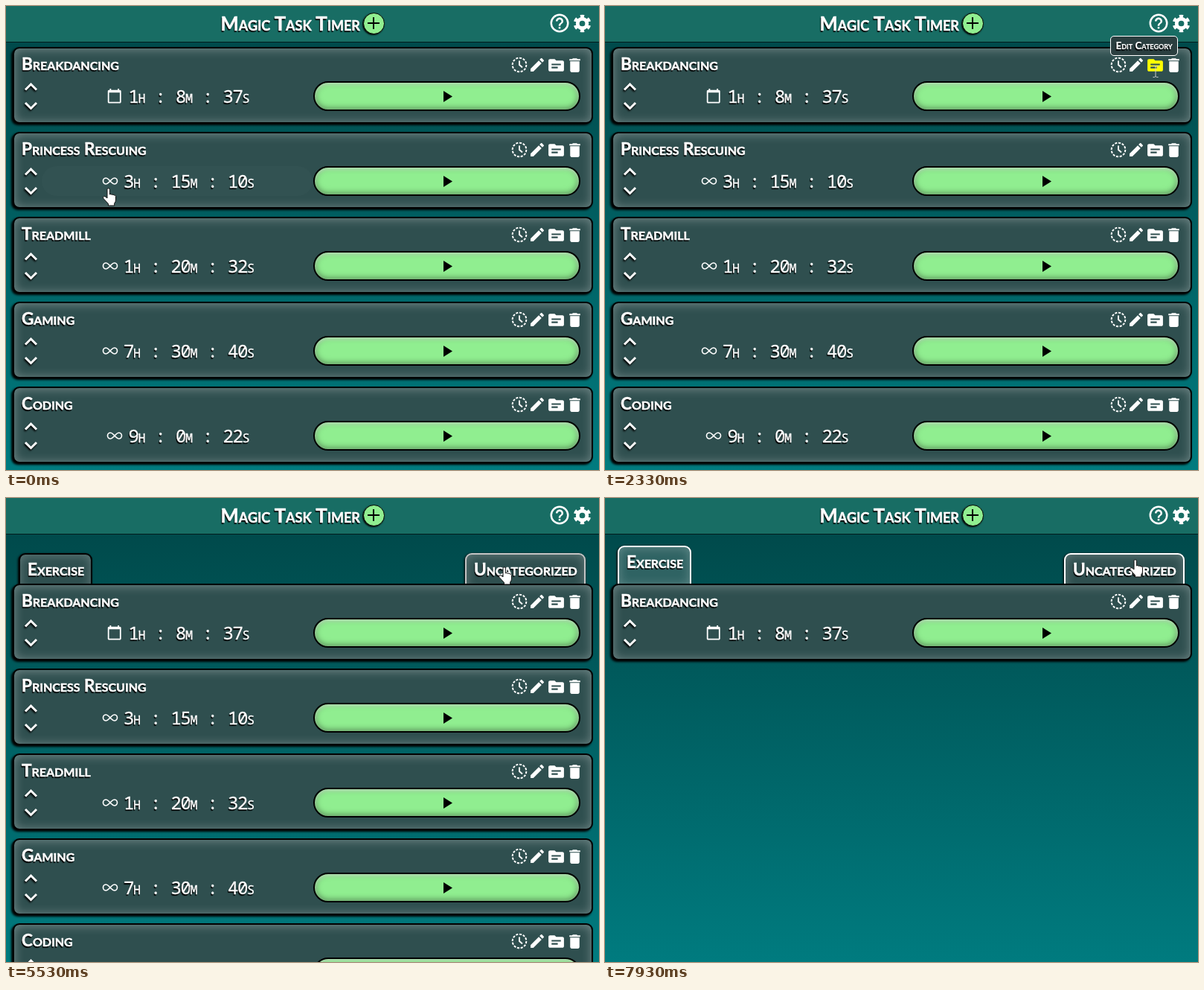
Write an HTML page that moves like this. It is 797 px wide and 623 px high and loops after 8 s.

```html
<!DOCTYPE html>
<html lang="en">
<head>
<meta charset="utf-8">
<title>Magic Task Timer</title>
<style>
  html, body { margin: 0; width: 100%; height: 100%; overflow: hidden; }
  body { position: relative; background: linear-gradient(#004647, #007b7f 623px); color: #fff; }
  div, svg { position: absolute; box-sizing: border-box; }
  svg { overflow: visible; fill: currentColor; }
  .caps { font: bold 22.5px/30px Lato, sans-serif; font-variant: small-caps; white-space: pre;
          -webkit-text-stroke: .5px; text-shadow: -1px 2px 1px #000; }
  .line { fill: none; stroke: currentColor; stroke-width: 2; }
  #header { left: 0; top: 0; width: 797px; height: 49px; background: #186d64; border-bottom: 1px solid #001c1c; }
  #title { left: 288.5px; top: 8px; font-size: 25.7px; }
  #add { left: 479.5px; top: 8.5px; width: 29px; height: 29px; border: 1px solid #000; border-radius: 50%;
         background: #90ee90; box-shadow: -1px 1px 2px #000; }
  #list { left: 0; top: 0; width: 797px; height: 0; }
  .task { left: 9px; width: 780px; height: 103px; border: 2px solid #000; border-radius: 9px; background: #2f4f4f;
          box-shadow: -2px 2px 3px #000, inset 0 1px 14px rgba(255, 255, 255, .34); }
  .task > * { margin: -2px; }
  .task .caps { left: 12px; top: 8px; }
  .arrows { filter: drop-shadow(-1px 2px 1px #000); stroke-width: 3; }
  .pill { left: 39px; top: 46px; width: 364px; height: 40px; border-radius: 20px;
          background: rgba(255, 255, 255, .015); opacity: 0; }
  .clock { top: 51px; font: 24px/30px "Noto Sans Mono", monospace; white-space: pre;
           letter-spacing: -.06em; word-spacing: 1.5px;
           -webkit-text-stroke: .3px; text-shadow: -1px 2px 1px #000; }
  .clock small { font-size: .7em; }
  .play { left: 404px; top: 46px; width: 359px; height: 40px; border: 2px solid #000; border-radius: 20px;
          background: #90ee90;
          box-shadow: inset 0 2px 5px rgba(255, 255, 255, .55), inset 0 -1px 8px rgba(0, 0, 0, .5); }
  .play svg { left: 173px; top: 11px; color: #000; }
  .tab { top: 74px; height: 54px; border: 2px solid #000; border-radius: 9px 9px 0 0; display: none;
         box-shadow: -1px 1px 3px #000, inset 0 1px 14px rgba(255, 255, 255, .25); }
  .tab .caps { left: 10px; top: 5px; }
  #tip { left: 679px; top: 40px; width: 91px; height: 27px; border: 1px solid #fff; border-radius: 5px;
         background: #2b3f40; text-align: center; font-size: 13.5px; line-height: 25px; -webkit-text-stroke: .2px; }
  #dialog { left: 437px; top: -40px; width: 448px; height: 211px; background: #292a2d;
            box-shadow: 0 1px 5px rgba(0, 0, 0, .6); font: 12.25px/20px "Open Sans", sans-serif; color: #e8eaed; }
  #dialog div { white-space: pre; }
  #field { left: 15px; top: 107px; width: 418px; height: 34px; border: 2px solid; border-radius: 4px; background: #202124; }
  #typed { left: 7px; top: 6px; height: 16px; border-right: 1px solid; font-size: 11.2px; line-height: 16px; }
  #ok { left: 288px; top: 164px; width: 68px; height: 32px; border-radius: 4px; background: #8ab4f8; color: #202124;
        text-align: center; line-height: 32px; font-weight: 600; }
  #cursor { left: 0; top: 0; }
</style>
</head>
<body>
<div id="list"></div>
<div id="header">
  <div id="title" class="caps">Magic Task Timer</div>
  <div id="add"></div>
</div>
<div id="tip" class="caps">Edit Category</div>
<div id="dialog">
  <div style="left:16px;top:51.5px;font-size:14.1px">localhost:3000 says</div>
  <div style="left:16px;top:80px">Enter a category for 'Breakdancing'.</div>
  <div id="field"><div id="typed"></div></div>
  <div id="ok">OK</div>
</div>
<svg id="cursor" width="1" height="1">
  <path id="hand" fill="#fff" stroke="#111" stroke-width="1"
    d="M-2 13V1.500a1.700 1.700 0 0 1 3.400 0V8q1.600-1.200 3 .4 1.700-1 2.800.6 2-.6 2.300 1.400V15q0 3-1.800 5v3h-8.200v-2.500L-7 13.500q-1.500-2.500 1-3 1.500.2 4 2.500z"/>
  <path id="beam" fill="none" stroke="#ccc" d="M-3.500-7.500h2l1.500 1 1.500-1h2M0-6.500v13M-3.500 7.500h2l1.500-1 1.500 1h2"/>
</svg>
<script>
const $ = id => document.getElementById(id);
const shapes = {
  help: '<path d="M11 18h2v-2h-2v2zm1-12c-2.210 0-4 1.790-4 4h2c0-1.100.9-2 2-2s2 .9 2 2c0 2-3 1.750-3 5h2c0-2.250 3-2.500 3-5 0-2.210-1.790-4-4-4z"/><circle class="line" cx="12" cy="12" r="9"/>',
  gear: '<circle cx="12" cy="12" r="5.200" fill="none" stroke="currentColor" stroke-width="4"/>' +
    '<circle cx="12" cy="12" r="8" fill="none" stroke="currentColor" stroke-width="3.600" pathLength="60" stroke-dasharray="5 5" stroke-dashoffset="-2.500"/>',
  plus: '<path class="line" d="M4 12h16M12 4v16"/>',
  history: '<circle class="line" cx="12" cy="12" r="9.300" pathLength="48" stroke-dasharray="2.600 1.400"/><path class="line" d="M12 6.500V12l4 3.500"/>',
  pencil: '<path d="M3 17.250V21h3.750L17.810 9.940l-3.750-3.750L3 17.250zM20.710 7.040c.39-.39.39-1.020 0-1.410l-2.340-2.340c-.39-.39-1.020-.39-1.410 0l-1.830 1.830 3.750 3.750 1.830-1.830z"/>',
  folder: '<path d="M20 6h-8l-2-2H4c-1.100 0-2 .9-2 2v12c0 1.100.9 2 2 2h16c1.100 0 2-.9 2-2V8c0-1.100-.9-2-2-2zm-6 10H6v-2h8v2zm4-4H6v-2h12v2z"/>',
  bin: '<path d="M6 19c0 1.100.9 2 2 2h8c1.100 0 2-.9 2-2V7H6v12zM19 4h-3.500l-1-1h-5l-1 1H5v2h14V4z"/>',
  calendar: '<path d="M20 3h-1V1h-2v2H7V1H5v2H4c-1.100 0-2 .9-2 2v16c0 1.100.9 2 2 2h16c1.100 0 2-.9 2-2V5c0-1.100-.9-2-2-2zm0 18H4V7h16v14z"/>',
  endless: '<path class="line" d="M12 12C9 9 7.800 7.200 5.400 7.200a4.800 4.800 0 0 0 0 9.600C7.800 16.800 9 15 12 12S16.200 7.200 18.600 7.200a4.800 4.800 0 0 1 0 9.600C16.200 16.800 15 15 12 12Z"/>'
};
const icon = (name, x, y, size) =>
  `<svg class="${name}" viewBox="0 0 24 24" width="${size}" height="${size}" style="left:${x - size / 2}px;top:${y - size / 2}px">${shapes[name]}</svg>`;

const tasks = [
  ['Breakdancing', 1, 8, 37, 'calendar'],
  ['Princess Rescuing', 3, 15, 10, 'endless'],
  ['Treadmill', 1, 20, 32, 'endless'],
  ['Gaming', 7, 30, 40, 'endless'],
  ['Coding', 9, 0, 22, 'endless']
];

function taskHtml([name, h, m, s, kind], i) {
  const shift = m > 9 ? -6.5 : 0;
  return `<div class="task" style="top:${55 + 114 * i}px">
    <div class="caps">${name}</div>
    <svg class="arrows line" width="1" height="1" style="left:0;top:0"><path d="M17 57.500l7.500-7.500 7.500 7.500M17 75l7.500 7.500L32 75"/></svg>
    <div class="pill"></div>
    ${icon(kind, 137 + shift, 66, kind === 'calendar' ? 21.5 : 20)}
    <div class="clock" style="left:${155.5 + shift}px">${h}<small>H</small> : ${m}<small>M</small> : ${s}<small>S</small></div>
    <div class="play"><svg width="12" height="15"><path d="M0 0l12 7.500L0 15z"/></svg></div>
    ${icon('history', 680.5, 24, 24)}${icon('pencil', 705, 24, 24)}${icon('folder', 730.5, 24, 25)}${icon('bin', 755.5, 24, 25)}
  </div>`;
}
const tabHtml = (id, left, width, name) =>
  `<div class="tab" id="${id}" style="left:${left}px;width:${width}px"><div class="caps">${name}</div></div>`;

$('list').innerHTML = tasks.map(taskHtml).join('');
$('list').insertAdjacentHTML('beforebegin',
  tabHtml('exercise', 17, 99, 'Exercise') + tabHtml('other', 617, 162, 'Uncategorized'));
$('header').insertAdjacentHTML('beforeend',
  icon('help', 743.5, 23, 30) + icon('gear', 774, 23, 29));
$('add').innerHTML = `<div style="color:#000;left:0;top:0">${icon('plus', 13.5, 13.5, 24)}</div>`;

const rows = [...document.querySelectorAll('.task')];
const plays = document.querySelectorAll('.play');
const folder = document.querySelector('.folder');
const pill = rows[1].querySelector('.pill');

const LOOP = 8000, OPEN = 2330, CLOSE = 5070, GROUPED = 5270, PICKED = 7000;
const keyTimes = [3670, 3800, 4000, 4130, 4400, 4470, 4530, 4730];
// time, x, y of the pointer
const path = [
  [70, 138, 245], [330, 300, 256], [600, 540, 240], [800, 660, 214], [870, 682, 148], [930, 700, 122],
  [1070, 726, 82], [1270, 740, 88], [2400, 740, 88], [2700, 670, 93], [5900, 670, 93], [6200, 400, 118],
  [6450, 120, 108], [6600, 54, 93], [7130, 54, 93], [7450, 330, 104], [7800, 700, 86], [7930, 713, 83]
];

const ramp = (t, start, length) => Math.min(1, Math.max(0, (t - start) / length));
const hover = (t, on, off, length = 300) =>
  Math.max(0, ramp(Math.min(t, off), on, length) - ramp(t, off, length));
const grey = level => `rgb(${[level, level, level].map(v => Math.round(v * 255))})`;

function pointerAt(t) {
  const next = path.findIndex(key => key[0] > t);
  if (next === 0) return path[0].slice(1);
  if (next < 0) return path[path.length - 1].slice(1);
  const [a, b] = [path[next - 1], path[next]];
  const p = ramp(t, a[0], b[0] - a[0]);
  return [a[1] + (b[1] - a[1]) * p, a[2] + (b[2] - a[2]) * p];
}

function drawDialog(t) {
  const dialog = $('dialog'), leaving = ramp(t, CLOSE - 10, 220);
  const entering = 1 - ramp(t, OPEN + 40, 260);
  const away = Math.max(leaving, entering);
  const open = t < CLOSE;
  dialog.style.opacity = 1 - (open ? away : away ** 2);
  dialog.style.transform = `translateY(${-23 * away}px)`;
  $('field').style.borderColor = open ? '#8ab4f8' : '#303236';
  $('typed').textContent = 'exercise'.slice(0, keyTimes.filter(k => k <= t).length);
  const caret = open && (t < 2930 || t >= 3470);
  $('typed').style.borderColor = caret ? '#fff' : 'transparent';
}

function draw(t) {
  const grouped = t >= GROUPED, picked = t >= PICKED;
  $('list').style.top = grouped ? '60px' : 0;
  rows.forEach((row, i) => row.style.display = picked && i ? 'none' : 'block');

  pill.style.opacity = hover(t, -300, 450);
  plays[0].style.borderColor = grey(hover(t, 880, 1040));
  plays[1].style.borderColor = grey(hover(t, 520, 850));
  folder.style.color = `rgb(255,255,${Math.round(255 * (1 - hover(t, 1130, CLOSE)))})`;
  $('tip').style.opacity = grouped ? 0 : ramp(t, 1330, 400);

  const exercise = $('exercise').style, other = $('other').style;
  exercise.display = other.display = grouped ? 'block' : 'none';
  exercise.top = picked ? '64px' : '74px';
  exercise.borderColor = grey(hover(t, 6430, LOOP, 250));
  exercise.background = picked ? '#2f6363' : '#2f4f4f';
  other.borderColor = grey(Math.max(hover(t, 5300, 5960), hover(t, 7680, LOOP, 250)));
  other.background = '#2f4f4f';

  drawDialog(t);

  const [x, y] = pointerAt(t), beam = t >= OPEN && t < CLOSE;
  $('cursor').style.transform = `translate(${x}px,${y}px)`;
  $('hand').style.display = beam ? 'none' : 'inline';
  $('beam').style.display = beam ? 'inline' : 'none';
}

const start = performance.now();
function tick() {
  draw((performance.now() - start) % LOOP);
  requestAnimationFrame(tick);
}
tick();
</script>
</body>
</html>
```
